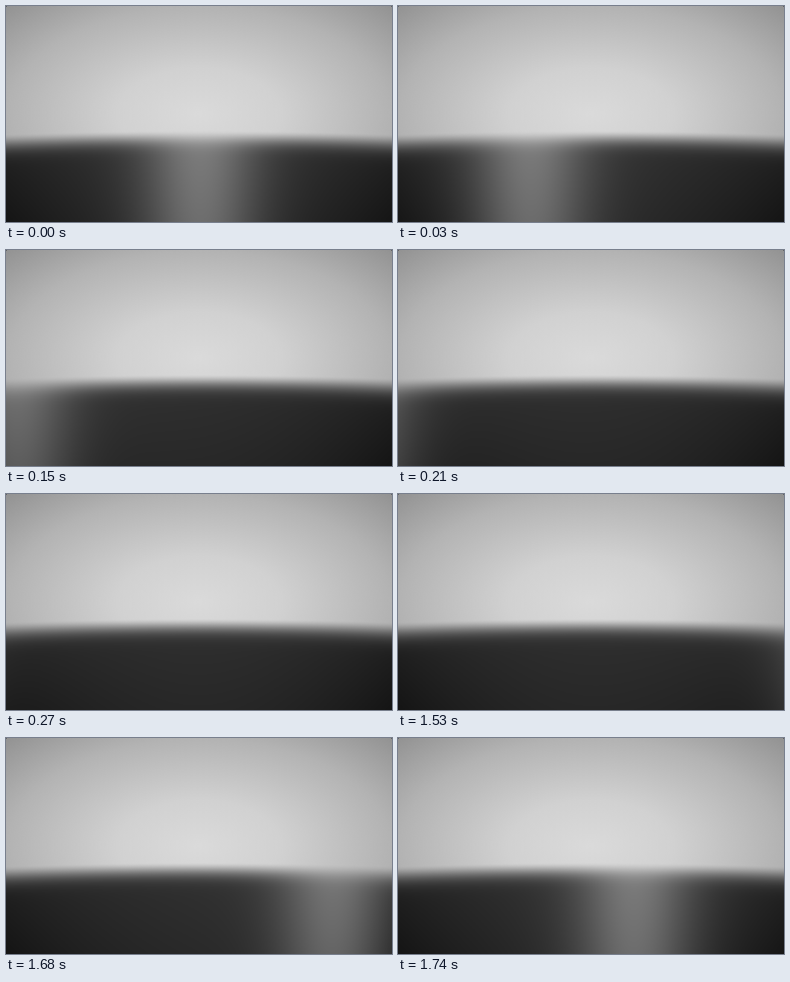
An HTML page with a canvas for the animation above (1.77 s loop, 640 by 360 pixels).

```html
<!DOCTYPE html>
<html lang="en">
<head>
<meta charset="utf-8">
<title>Light over the horizon</title>
<style>
  html, body { margin: 0; width: 100%; height: 100%; overflow: hidden; background: #000; }
  canvas { display: block; width: 640px; height: 360px; border-radius: 2px 2px 0 0; }
</style>
</head>
<body>
<canvas id="stage" width="640" height="360"></canvas>
<script>
const W = 640, H = 360, LOOP = 1770, STEP = 30, HORIZON = 206;
const ctx = document.getElementById('stage').getContext('2d');

// [time in ms, x of the light's centre]; the light rests off stage between passes
const path = [
  [0, 322], [30, 218], [60, 158], [150, 12], [270, -150], [1529, -150],
  [1530, 735], [1650, 610], [1680, 545], [1740, 392], [1770, 322]
];

function lightX(t) {
  const i = path.findIndex(([end]) => t < end);
  const [t0, x0] = path[i - 1], [t1, x1] = path[i];
  return x0 + (x1 - x0) * (t - t0) / (t1 - t0);
}

function drawSky() {
  ctx.save();
  ctx.translate(W / 2, H / 2);
  ctx.scale(W / H, 1);
  const sky = ctx.createRadialGradient(0, 0, 0, 0, 0, H * Math.SQRT1_2);
  sky.addColorStop(0, 'rgb(218,218,218)');
  sky.addColorStop(0.3, 'rgb(209,209,209)');
  sky.addColorStop(0.7, 'rgb(179,179,179)');
  sky.addColorStop(1, 'rgb(146,146,146)');
  ctx.fillStyle = sky;
  ctx.fillRect(-W, -H, 2 * W, 2 * H);
  ctx.restore();
}

drawSky();
const ground = ctx.getImageData(0, HORIZON, W, H - HORIZON);
const sky = ground.data.filter((_, i) => i % 4 === 0);
const cover = new Float32Array(sky.length);
const shade = new Float32Array(sky.length);

for (let i = 0; i < sky.length; i++) {
  const y = Math.floor(i / W), u = (i % W - W / 2) / (W / 2), v = y / (H - HORIZON);
  const depth = Math.max(0, y - 1 - 6 * u * u);
  cover[i] = 1 - Math.exp(-Math.pow(depth / (19 + 3 * u * u), 1.7));
  shade[i] = 48 - 9 * v - (11 + 8 * v) * u * u;
}

function drawGround(centre) {
  const glow = Array.from({ length: W }, (_, x) => {
    const d = x - centre;
    return 70 * Math.exp(-((d / 95) ** 2)) + 8 * Math.exp(-((d / 200) ** 2));
  });
  for (let i = 0; i < sky.length; i++) {
    const fade = 1 - 0.1 * i / sky.length;
    const lit = shade[i] + glow[i % W] * fade;
    const grey = sky[i] + (lit - sky[i]) * cover[i];
    ground.data.fill(Math.round(grey), 4 * i, 4 * i + 3);
  }
  ctx.putImageData(ground, 0, HORIZON);
}

let shown = null;
function frame() {
  const t = Math.floor(performance.now() % LOOP / STEP) * STEP;
  const centre = lightX(t);
  if (centre !== shown) drawGround(shown = centre);
  requestAnimationFrame(frame);
}
frame();
</script>
</body>
</html>
```
